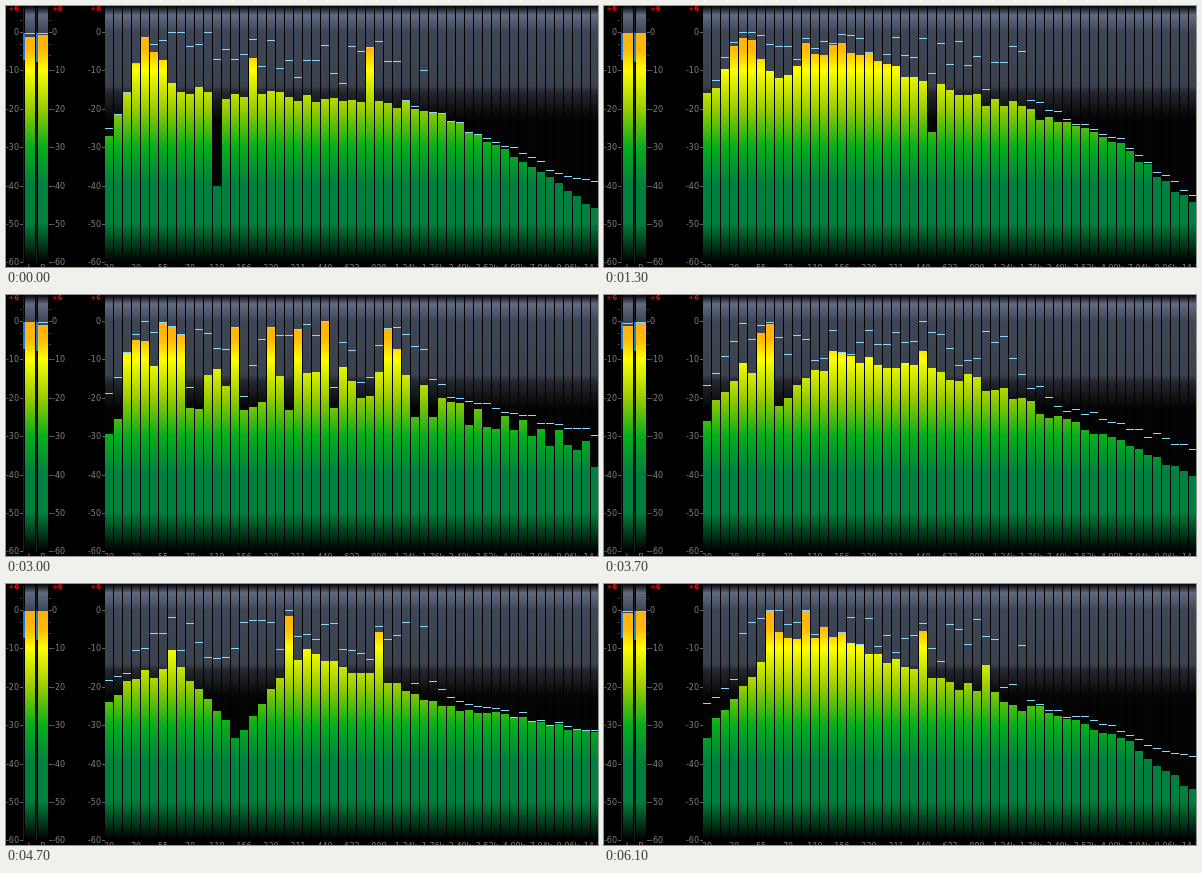
Write an HTML page with a canvas that moves like this. It is 592x261 px and loops after 6200 ms.

```html
<!DOCTYPE html>
<html lang="en">
<head>
<meta charset="utf-8">
<title>Spectrum analyser</title>
<style>
html, body { margin: 0; height: 100%; overflow: hidden; background: #000; }
canvas { display: block; }
</style>
</head>
<body>
<canvas id="stage" width="592" height="261"></canvas>
<script>
const ctx = document.getElementById('stage').getContext('2d');
const STEP = 100, STEPS = 62, BARS = 55, LEFT = 99, PITCH = 9, ZERO = 26, FLOOR = 257;
const FONT = '8px "DejaVu Sans", sans-serif';
const dbToY = db => Math.round(ZERO - db * 3.84);

// Each pose is a contour through shared knots, plus a few bars that stand out.
const KNOTS = [0, 4, 8, 14, 22, 30, 38, 46, 54];
const poses = [];
function pose(step, contour, accents) {
  const levels = Array.from({ length: BARS }, (_, i) => {
    const k = Math.min(KNOTS.length - 2, KNOTS.findLastIndex(bar => bar <= i));
    return contour[k] + (contour[k + 1] - contour[k]) * (i - KNOTS[k]) / (KNOTS[k + 1] - KNOTS[k]);
  });
  poses.push({ step, levels: Object.assign(levels, accents) });
}
pose(0, [135, 35, 84, 90, 90, 92, 113, 154, 201], { 12: 181, 16: 49, 29: 41 });
pose(13, [94, 26, 76, 38, 65, 92, 110, 138, 198], { 11: 36, 25: 121 });
pose(23, [109, 26, 100, 114, 118, 92, 105, 119, 137], { 9: 163, 15: 168, 22: 39, 24: 28, 32: 34 });
pose(37, [120, 73, 108, 62, 72, 86, 120, 147, 182], { 6: 42, 7: 31, 24: 52 });
pose(47, [114, 90, 85, 152, 68, 96, 122, 136, 149], { 7: 62, 20: 27, 30: 48 });
pose(54, [146, 91, 46, 125, 90, 108, 142, 156, 213], { 7: 30, 16: 70, 24: 64, 30: 66 });
pose(61, [152, 99, 50, 48, 82, 108, 130, 152, 207], { 7: 31, 11: 27, 24: 46, 31: 75 });

// Repeatable noise from -1 to 1.
function noise(i, step) {
  const n = Math.sin(i * 127.1 + step * 311.7 + 4.2) * 43758.5453;
  return 2 * (n - Math.floor(n)) - 1;
}

// Blend neighbouring poses; between them bars flicker and some leap up.
function barLevel(i, step) {
  const next = Math.max(1, poses.findIndex(p => p.step >= step));
  const a = poses[next - 1], b = poses[next];
  const f = (step - a.step) / (b.step - a.step);
  const swing = Math.sin(Math.PI * f);
  const reach = i < 38 ? 1 : 0.5;
  let y = a.levels[i] + (b.levels[i] - a.levels[i]) * f;
  y += noise(i, step) * reach * (6 + 20 * swing);
  if (i > 3 && i < 36 && noise(i + 200, step) > 0.72) y -= (y - ZERO) * 0.85 * swing;
  return Math.round(Math.max(ZERO, y));
}

const meterLevel = (i, step) => Math.round(27 + 12 * noise(i + 90, step) ** 4);

// Highest recent level: held for a while, then falling.
function peakHold(level, i, step) {
  let top = FLOOR;
  for (let age = 0; age < 16; age++) {
    const past = (step - age + STEPS) % STEPS;
    top = Math.min(top, level(i, past) + Math.max(0, age - 6) * 3);
  }
  return top;
}

function gradient(...stops) {
  const g = ctx.createLinearGradient(0, 0, 0, FLOOR);
  for (const [y, color] of stops) g.addColorStop(y / FLOOR, color);
  return g;
}
const lit = gradient([26, '#ffb010'], [45, '#ffba08'], [64, '#ffff00'], [103, '#98cc00'],
  [141, '#06ae1c'], [178, '#008040'], [217, '#00803c'], [256, '#000']);
const unlit = gradient([1, '#0c0e12'], [9, '#626a82'], [26, '#3e4656'], [80, '#3a424e'],
  [86, '#24282f'], [113, '#040404'], [257, '#040404']);

function rect(x, y, w, h, color) {
  ctx.fillStyle = color;
  ctx.fillRect(x, y, w, h);
}

function bar(x, w, level) {
  rect(x, 0, w, FLOOR, unlit);
  rect(x, level, w, FLOOR - level, lit);
}

const peakLine = (x, w, y) => rect(x, y, w, 1, '#8cd8ff');

function text(label, x, y, align, color = '#808080') {
  ctx.textAlign = align;
  ctx.fillStyle = color;
  ctx.fillText(label, x, y);
}

function scale(x, align, tickX) {
  ctx.font = 'bold 7px "DejaVu Sans", sans-serif';
  text('+6', x, 5, align, '#ff0000');
  ctx.font = FONT;
  for (let db = 0; db >= -60; db -= 10) {
    text(db, x, dbToY(db) + 3, align);
    rect(tickX, dbToY(db), 3, 1, '#606060');
  }
}

function drawMeters(step) {
  for (const db of [3, -3, -6])
    for (const x of [14, 43]) rect(x, dbToY(db), 2, 1, '#404040');
  ['L', 'R'].forEach((name, i) => {
    const x = 19 + 13 * i, level = meterLevel(i, step), peak = peakHold(meterLevel, i, step);
    rect(x - 2, 2, 1, 255, '#202020');
    bar(x, 10, level);
    if (peak < level) peakLine(x, 10, peak);
    rect(x - 2, 27, 2, 27 + 2 * i, '#1c78dc');
    text(name, x + 5, 265, 'center');
  });
}

function drawSpectrum(step) {
  for (let i = 0; i < BARS; i++) {
    const x = LEFT + i * PITCH;
    bar(x, PITCH - 1, barLevel(i, step));
    peakLine(x, PITCH - 1, peakHold(barLevel, i, step));
  }
  for (let n = 0; n < 19; n++) {
    const hz = n < 2 ? 20 + 10 * n : 440 * 2 ** ((n - 8) / 2);
    const label = hz < 1000 ? Math.round(hz) : (hz / 1000).toFixed(hz < 10000 ? 2 : 1) + 'k';
    text(label, 103 + n * 27, 265, 'center');
  }
}

function draw() {
  const step = Math.floor(performance.now() / STEP) % STEPS;
  rect(0, 0, 592, 261, '#000');
  scale(13, 'right', 14);
  scale(46, 'left', 43);
  scale(95, 'right', 96);
  drawMeters(step);
  drawSpectrum(step);
  requestAnimationFrame(draw);
}
draw();
</script>
</body>
</html>
```
